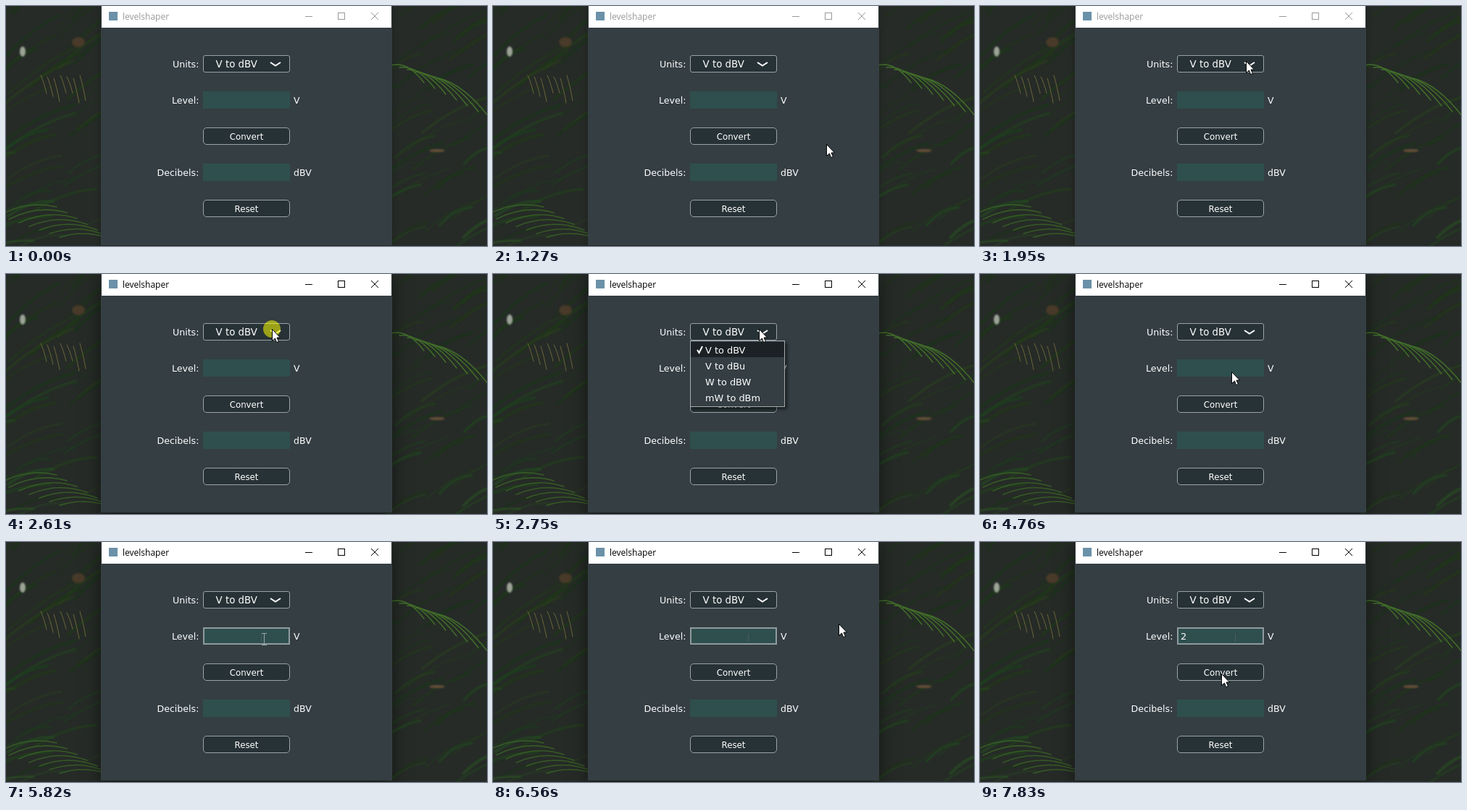
Write an HTML page with a canvas that moves like this. It is 664 px wide and 332 px high and loops after 8000 ms.

```html
<!DOCTYPE html>
<html lang="en">
<head>
<meta charset="utf-8">
<title>levelshaper</title>
<style>
html, body { margin: 0; width: 100%; height: 100%; overflow: hidden; background: #262b27; }
canvas { display: block; }
</style>
</head>
<body>
<canvas id="stage" width="664" height="332"></canvas>
<script>
const W = 664, H = 332, LOOP = 8000, TICK = 70;
const ctx = document.getElementById('stage').getContext('2d');
const SANS = '"DejaVu Sans", sans-serif';
const BODY = '#343e43', DARK = '#273236', EDGE = '#9aa2a6', TEAL = '#2f4f4f';

const ACTIVATE = 2610, OPEN = 2750, CLOSE = 4020, FOCUS = 5290, LEAVE = 5820, TYPE = 6690;
const CLICK = 135, BLINK = 400;
const ROW = 50, FIELD_X = 272, FIELD_W = 120, FIELD_H = 24;
const rowTop = n => 68 + n * ROW;

// Each move starts where the one before it ended.
const entry = { x: 501, y: 246 };
const moves = [
  { start: 1130, end: 1620, x: 367, y: 69 },
  { start: 1880, end: 1950, x: 367, y: 76 },
  { start: 4410, end: 4760, x: 347, y: 135 },
  { start: LEAVE, end: 6180, x: 477, y: 113 },
  { start: 7620, end: 7830, x: 333, y: 182 }
];

const mix = (a, b, p) => a + (b - a) * p;
const ease = p => (1 - Math.cos(Math.PI * p)) / 2;

function seeded(seed) {
  return () => (seed = (seed * 16807) % 2147483647) / 2147483647;
}

function rect(x, y, w, h, color) {
  ctx.fillStyle = color;
  ctx.fillRect(x, y, w, h);
}

function line(points, color, width = 1) {
  ctx.beginPath();
  points.forEach(([x, y]) => ctx.lineTo(x, y));
  ctx.strokeStyle = color;
  ctx.lineWidth = width;
  ctx.stroke();
}

function frameRect(x, y, w, h, color, width = 1) {
  ctx.strokeStyle = color;
  ctx.lineWidth = width;
  ctx.strokeRect(x + width / 2, y + width / 2, w - width, h - width);
}

function text(str, x, y, size, align = 'left', color = '#fff', family = SANS) {
  ctx.font = `${size}px ${family}`;
  ctx.textAlign = align;
  ctx.fillStyle = color;
  ctx.fillText(str, x, y);
}

function button(row, radius) {
  ctx.beginPath();
  ctx.roundRect(FIELD_X + 0.5, rowTop(row) + 0.5, FIELD_W - 1, FIELD_H - 1, radius);
  ctx.fillStyle = DARK;
  ctx.fill();
  ctx.strokeStyle = EDGE;
  ctx.lineWidth = 1;
  ctx.stroke();
}

function makeBackdrop() {
  const layer = document.createElement('canvas');
  layer.width = W;
  layer.height = H;
  const c = layer.getContext('2d'), random = seeded(71);
  c.fillStyle = '#262b27';
  c.fillRect(0, 0, W, H);
  c.lineCap = 'round';

  function blade(x, y, dx, dy, lift, color, width) {
    c.beginPath();
    c.moveTo(x, y);
    c.quadraticCurveTo(x + dx / 2, y + dy / 2 - lift, x + dx, y + dy);
    c.strokeStyle = color;
    c.lineWidth = width;
    c.stroke();
  }
  function spot(x, y, rx, ry, color) {
    c.fillStyle = color;
    c.beginPath();
    c.ellipse(x, y, rx, ry, 0, 0, Math.PI * 2);
    c.fill();
  }

  // Blurred leaves, greener towards the bottom.
  c.filter = 'blur(1px)';
  for (let i = 0; i < 80; i++) {
    const depth = i / 80, right = i % 2, length = mix(40, 100, random());
    const x = mix(-40, 110, random()) + right * 532, y = mix(10, 350, depth);
    const light = mix(13, 22, random() * depth + 0.2);
    const tilt = right ? -0.55 : mix(-0.9, -0.2, depth);
    blade(x, y, length, length * tilt, 12,
      `hsla(${mix(95, 125, random())}, 38%, ${light}%, .8)`, mix(1, 4, random()));
  }
  spot(100, 50, 9, 7, '#493a29');
  spot(23, 63, 4, 7, '#9ca397');
  spot(595, 200, 11, 2, '#665039');

  // Bright arching leaves on the right, hanging tips on the left.
  c.filter = 'blur(0.5px)';
  for (let i = 0; i < 7; i++) {
    blade(532 + i * 11, 82 + i * 3, 45 + i * 4, 24 + i * 5, 18, '#426d2b', 1.5);
    blade(48 + i * 9, 96 + i % 3 * 2, 8, 18 + random() * 18, 4, '#6b653b', 1);
    blade(-10 + i * 14, 290 + i * 5, 80, -12 + i * 3, 16, '#365a26', 1.6);
  }
  return layer;
}
const backdrop = makeBackdrop();

function drawWindow(active) {
  const ink = active ? '#000' : '#999';
  ctx.save();
  ctx.shadowColor = `rgba(0,0,0,${active ? 0.5 : 0.25})`;
  ctx.shadowBlur = active ? 22 : 8;
  ctx.shadowOffsetY = active ? 4 : 1;
  rect(131, -1, 402, active ? 331 : 332, '#394145');
  ctx.restore();
  rect(132, 0, 400, 330, BODY);
  rect(132, 0, 400, 30, '#fff');
  rect(142, 8, 12, 12, '#6b91a8');
  text('levelshaper', 161, 19, 12, 'left', ink, '"Open Sans", sans-serif');
  line([[413, 14.5], [423, 14.5]], ink);
  frameRect(458, 9, 10, 10, ink);
  for (const slope of [-5, 5]) line([[504, 14 - slope], [514, 14 + slope]], ink);
}

function drawForm(t) {
  const baseline = row => rowTop(row) + 17;
  const label = (str, row) => text(str, 266.4, baseline(row), 12.6, 'right');
  const caption = (str, row) => text(str, FIELD_X + FIELD_W / 2, baseline(row), 11.8, 'center');
  const unit = (str, row) => text(str, 397, baseline(row), 12.5);

  label('Units:', 0);
  button(0, 2.5);
  text('V to dBV', 289.6, baseline(0), 13.3);
  line([[365, 78], [372, 82.5], [379, 78]], '#fff', 2);

  label('Level:', 1);
  rect(FIELD_X, rowTop(1), FIELD_W, FIELD_H, TEAL);
  unit('V', 1);
  if (t >= FOCUS) drawFocus(t);

  button(2, 4.5);
  caption('Convert', 2);

  label('Decibels:', 3);
  rect(FIELD_X, rowTop(3), FIELD_W, FIELD_H, TEAL);
  unit('dBV', 3);

  button(4, 4.5);
  caption('Reset', 4);
}

function drawFocus(t) {
  const typed = t >= TYPE;
  const since = Math.max(0, t - (typed ? TYPE - TICK : FOCUS + TICK));
  frameRect(FIELD_X, rowTop(1), FIELD_W, FIELD_H, '#8f9a9f', 2);
  if (t >= LEAVE) rect(352, 127, 1, 11, '#4b5b5e');
  if (typed) text('2', 277, rowTop(1) + 17, 13);
  if (Math.floor(since / BLINK) % 2 === 0) rect(typed ? 285 : 277, 123, 1, 15, '#fff');
}

function drawMenu() {
  ctx.save();
  ctx.shadowColor = 'rgba(0,0,0,.5)';
  ctx.shadowBlur = 4;
  ctx.shadowOffsetX = ctx.shadowOffsetY = 3;
  rect(FIELD_X, 92, 131, 92, BODY);
  ctx.restore();
  rect(273, 94, 129, 21, '#1b2124');
  frameRect(FIELD_X, 92, 131, 92, '#a4abae');
  ['V to dBV', 'V to dBu', 'W to dBW', 'mW to dBm'].forEach(
    (item, i) => text(item, 293, 110 + 22 * i, 12.9));
  line([[282, 105], [284.5, 109], [289, 100]], '#fff', 2);
}

function pointerAt(t) {
  const i = moves.findLastIndex(m => t >= m.start);
  if (i < 0) return null;
  const to = moves[i], from = moves[i - 1] || entry;
  const steps = Math.round((to.end - to.start) / TICK) + 1;
  const step = Math.floor((t - to.start) / (to.end - to.start) * (steps - 1) + 0.02);
  const p = ease(Math.min(1, (step + 1) / steps));
  return [Math.round(mix(from.x, to.x, p)), Math.round(mix(from.y, to.y, p))];
}

function drawPointer(t) {
  const pos = pointerAt(t);
  if (!pos) return;
  const [x, y] = pos;
  if ([ACTIVATE, CLOSE, FOCUS].some(at => t >= at && t < at + CLICK - 5)) {
    ctx.fillStyle = 'rgba(255,255,0,.54)';
    ctx.beginPath();
    ctx.arc(x, y, 12, 0, Math.PI * 2);
    ctx.fill();
  }
  if (t >= FOCUS && t < TYPE && x < FIELD_X + FIELD_W) {
    rect(x, y - 8, 1, 16, '#9aa8a8');
    for (const end of [-8, 8]) rect(x - 3, y + end, 7, 1, '#9aa8a8');
    return;
  }
  ctx.beginPath();
  [[0, 0], [0, 16], [4, 12.5], [6, 18], [9, 17], [6.5, 11.5], [11, 11.5]].forEach(
    ([dx, dy]) => ctx.lineTo(x + 0.5 + dx, y + 0.5 + dy));
  ctx.closePath();
  ctx.fillStyle = '#fff';
  ctx.fill();
  ctx.strokeStyle = '#000';
  ctx.lineWidth = 1;
  ctx.stroke();
}

function frame() {
  const t = performance.now() % LOOP;
  ctx.drawImage(backdrop, 0, 0);
  drawWindow(t >= ACTIVATE);
  drawForm(t);
  if (t >= OPEN && t < CLOSE) drawMenu();
  drawPointer(t);
  requestAnimationFrame(frame);
}
frame();
</script>
</body>
</html>
```
